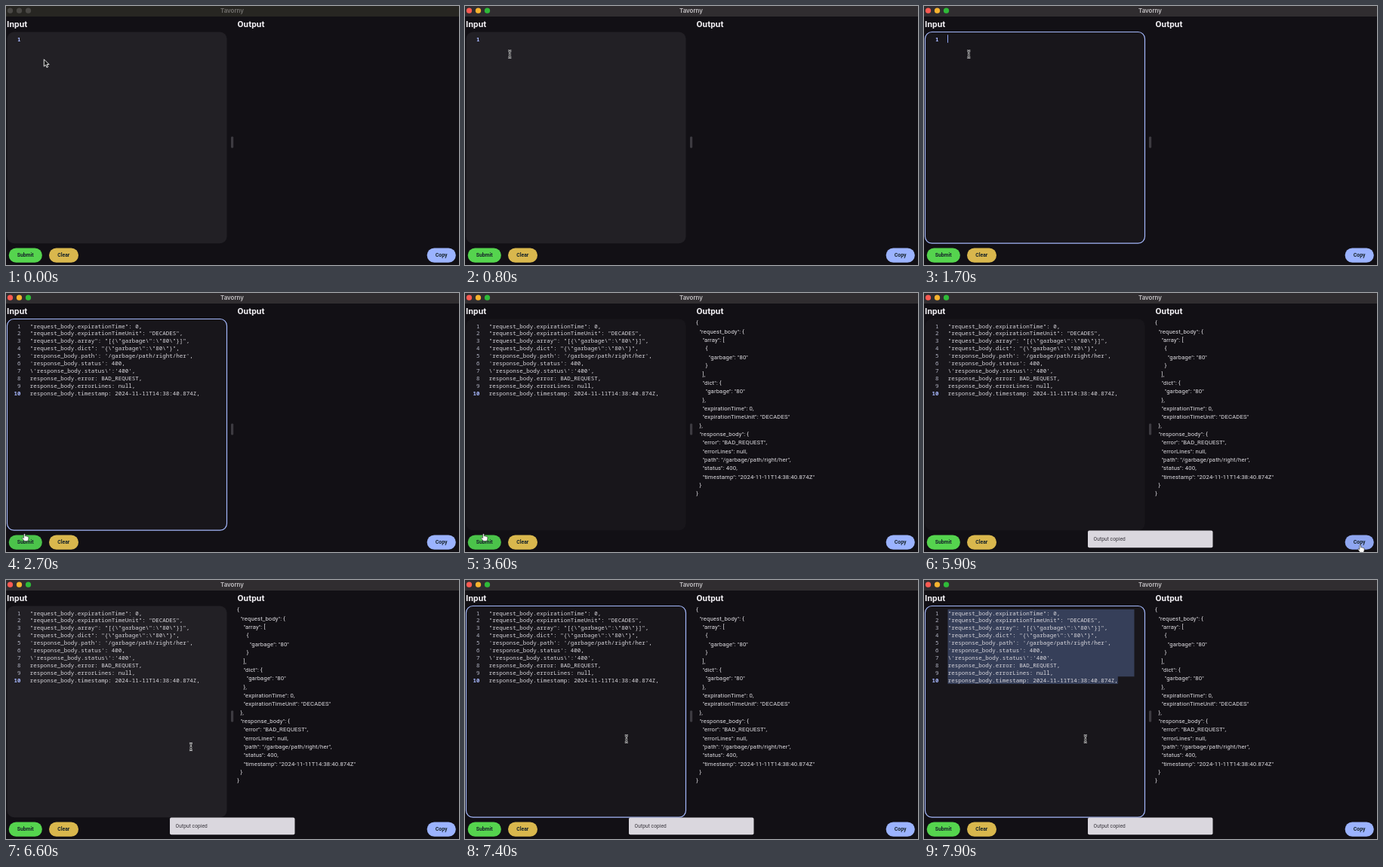
Write an HTML page that moves like this. It is 600 px wide and 344 px high and loops after 8 s.

```html
<!DOCTYPE html>
<html lang="en">
<head>
<meta charset="utf-8">
<title>Tavorny</title>
<style>
html, body { margin: 0; width: 100%; height: 100%; overflow: hidden; background: #121015; }
svg { display: block; width: 600px; height: 344px; font-family: Roboto, sans-serif; }
text { white-space: pre; }
.head { font-size: 11.6px; font-weight: 700; letter-spacing: .1px; fill: #f1eff3; }
.btn { font-size: 6.85px; font-weight: 600; text-anchor: middle; fill: #17242b; }
#code, #nums { font: 7.5px "Noto Sans Mono", "DejaVu Sans Mono", monospace; fill: #d9d7dd; }
#nums { text-anchor: end; fill: #b4b6c6; }
#nums .on { font-weight: 700; fill: #a9b9ff; }
#out { font-size: 7.7px; letter-spacing: .14px; fill: #e0dee3; }
</style>
</head>
<body>
<svg viewBox="0 0 600 344">
  <rect id="bar" width="600" height="14"/>
  <circle class="light" cx="5.5" cy="6.2" r="3.6"/>
  <circle class="light" cx="17.5" cy="6.2" r="3.6"/>
  <circle class="light" cx="29.5" cy="6.2" r="3.6"/>
  <text id="name" x="299.5" y="8.8" text-anchor="middle" font-family="Inter, sans-serif" font-size="7.9" font-weight="600">Tavorny</text>
  <text class="head" x="1" y="28">Input</text>
  <text class="head" x="306.5" y="28">Output</text>
  <rect id="panel" x="1.5" y="34.5" width="291" height="280.7" rx="9" stroke-width="1.2"/>
  <path id="sel" d="M31.5 39H278.5V128.2H256.8V138H31.5Z" fill="#363f59"/>
  <g id="nums"></g>
  <g id="code"></g>
  <rect id="caret" width="1" height="10.5" fill="#8fa4f5"/>
  <rect x="298" y="173.5" width="3.2" height="15" rx="1" fill="#3d3b41"/>
  <g id="out"></g>
  <rect id="submit" x="3.7" y="321.4" width="44.2" height="19.4" rx="9.7"/>
  <text class="btn" x="25.7" y="333.4">Submit</text>
  <rect x="57" y="321.4" width="39" height="19.4" rx="9.7" fill="#d9b74d"/>
  <text class="btn" x="76.3" y="333.4">Clear</text>
  <rect id="copy" x="557.6" y="321.4" width="38.2" height="19.4" rx="9.7"/>
  <text class="btn" x="576.6" y="333.4">Copy</text>
  <g id="toast">
    <rect x="217" y="315.5" width="165.5" height="22.7" rx="2" fill="#dad7de"/>
    <text x="224.6" y="329.2" font-size="6.6" letter-spacing=".08" fill="#36333a">Output copied</text>
  </g>
  <g id="mouse">
    <path class="arrow" d="M0 0V9.4L2.2 7.4L3.7 10.8L5.3 10.1L3.9 6.8H6.8Z" fill="#111" stroke="#fff" stroke-width=".9"/>
    <g class="beam" fill="none">
      <path d="M-2-4.6Q0-4.6 0-3Q0-4.6 2-4.6M0-3V3M-2 4.6Q0 4.6 0 3Q0 4.6 2 4.6M-1.4 1H1.4" stroke="#e8e8ea" stroke-width="2.2"/>
      <path d="M-2-4.6Q0-4.6 0-3Q0-4.6 2-4.6M0-3V3M-2 4.6Q0 4.6 0 3Q0 4.6 2 4.6M-1.4 1H1.4" stroke="#111" stroke-width=".8"/>
    </g>
    <path class="hand" d="M-.9.8Q0-.6.9.8V3.4Q2 2.7 2.6 3.7Q3.7 3.1 4.2 4.2Q5.5 3.9 5.5 5.2Q5.6 7.6 4.4 9.8H-.4Q-1.4 7.9-3 6.3Q-3.3 4.8-1.8 5.2L-.9 6Z" fill="#fff" stroke="#222" stroke-width=".6"/>
  </g>
</svg>
<script>
const LOOP = 8000;
const ACTIVE = 800, FOCUS = 1250, PASTE = 2200, SUBMIT = 3000, COPY = 5400, REFOCUS = 6850, SELECT = 7600;

const input = String.raw`"request_body.expirationTime": 0,
"request_body.expirationTimeUnit": "DECADES",
"request_body.array": "[{\"garbage\":\"80\"}]",
"request_body.dict": "{\"garbage\":\"80\"}",
'response_body.path': '/garbage/path/right/her',
'response_body.status': 400,
\'response_body.status\':'400',
response_body.error: BAD_REQUEST,
response_body.errorLines: null,
response_body.timestamp: 2024-11-11T14:38:40.874Z,`.split("\n");

const output = JSON.stringify({
  request_body: {
    array: [{ garbage: "80" }],
    dict: { garbage: "80" },
    expirationTime: 0,
    expirationTimeUnit: "DECADES"
  },
  response_body: {
    error: "BAD_REQUEST",
    errorLines: null,
    path: "/garbage/path/right/her",
    status: 400,
    timestamp: "2024-11-11T14:38:40.874Z"
  }
}, null, 1).split("\n");

// time, x, y of the pointer
const path = [
  [300, 50.3, 70.8], [500, 59.3, 64], [2200, 59.3, 64], [2600, 24.5, 319.6],
  [3600, 24.5, 319.6], [4500, 347.5, 335], [5100, 577.8, 334.6],
  [6150, 577.8, 334.6], [6700, 213.8, 211]
];

const $ = id => document.getElementById(id);
const show = (el, on) => el.style.display = on ? "" : "none";
const clamp = v => Math.max(0, Math.min(1, v));
const smooth = v => v * v * (3 - 2 * v);
const rowY = i => 46.5 + i * 9.92;

function addText(group, x, y, str) {
  const el = document.createElementNS("http://www.w3.org/2000/svg", "text");
  el.setAttribute("x", x);
  el.setAttribute("y", y);
  el.textContent = str;
  $(group).append(el);
  return el;
}

input.forEach((line, i) => addText("code", 31.7, rowY(i), line));
const nums = input.map((_, i) => addText("nums", 19.4, rowY(i), i + 1));
output.forEach((line, i) => {
  const body = line.trimStart();
  addText("out", 306.3 + (line.length - body.length) * 4.15, 42.4 + i * 11.35, body);
});

function pointer(t) {
  const n = path.findIndex(p => p[0] > t);
  if (n === 0) return path[0].slice(1);
  if (n < 0) return path[path.length - 1].slice(1);
  const [a, b] = [path[n - 1], path[n]];
  const k = smooth((t - a[0]) / (b[0] - a[0]));
  return [a[1] + (b[1] - a[1]) * k, a[2] + (b[2] - a[2]) * k];
}

function draw(t) {
  const active = t >= ACTIVE, pasted = t >= PASTE, selected = t >= SELECT;
  const focused = t >= FOCUS && t < SUBMIT || t >= REFOCUS;
  const [x, y] = pointer(t);
  const overPanel = x > 1 && x < 293 && y > 34 && y < 315;
  const overSubmit = x > 3 && x < 48 && y > 317;
  const overCopy = x > 557 && x < 596 && y > 317;

  $("bar").setAttribute("fill", active ? "#302d30" : "#272622");
  $("name").setAttribute("fill", active ? "#c5c2c5" : "#73716f");
  document.querySelectorAll(".light").forEach((el, i) =>
    el.setAttribute("fill", active ? ["#fb5a52", "#f7b32f", "#2fba39"][i] : "#4a4845"));

  $("panel").setAttribute("fill", overPanel && !focused ? "#222025" : "#18161b");
  $("panel").setAttribute("stroke", focused ? "#a4b8fb" : "none");
  $("submit").setAttribute("fill", overSubmit ? "#4bc34a" : "#55d44e");
  $("copy").setAttribute("fill", overCopy ? "#8fa6f0" : "#9bb3ff");

  const row = pasted ? 9 : 0;
  nums.forEach((el, i) => {
    show(el, i <= row);
    el.setAttribute("class", i === row ? "on" : "");
  });
  show($("code"), pasted);
  show($("sel"), selected);
  show($("out"), t >= SUBMIT);

  const since = t - (t >= REFOCUS ? REFOCUS : pasted ? PASTE : FOCUS);
  show($("caret"), focused && !selected && since % 1000 < 500);
  $("caret").setAttribute("x", pasted ? 257 : 31);
  $("caret").setAttribute("y", rowY(row) - 8.2);

  $("toast").setAttribute("opacity", clamp((t - COPY) / 250));

  const kind = t < 450 ? "arrow" : overPanel ? "beam" : overSubmit || overCopy ? "hand" : "arrow";
  for (const el of $("mouse").children) show(el, el.getAttribute("class") === kind);
  $("mouse").setAttribute("transform", `translate(${x} ${y})`);
}

const start = performance.now();
function tick(now) {
  draw(Math.max(0, now - start) % LOOP);
  requestAnimationFrame(tick);
}
draw(0);
requestAnimationFrame(tick);
</script>
</body>
</html>
```
